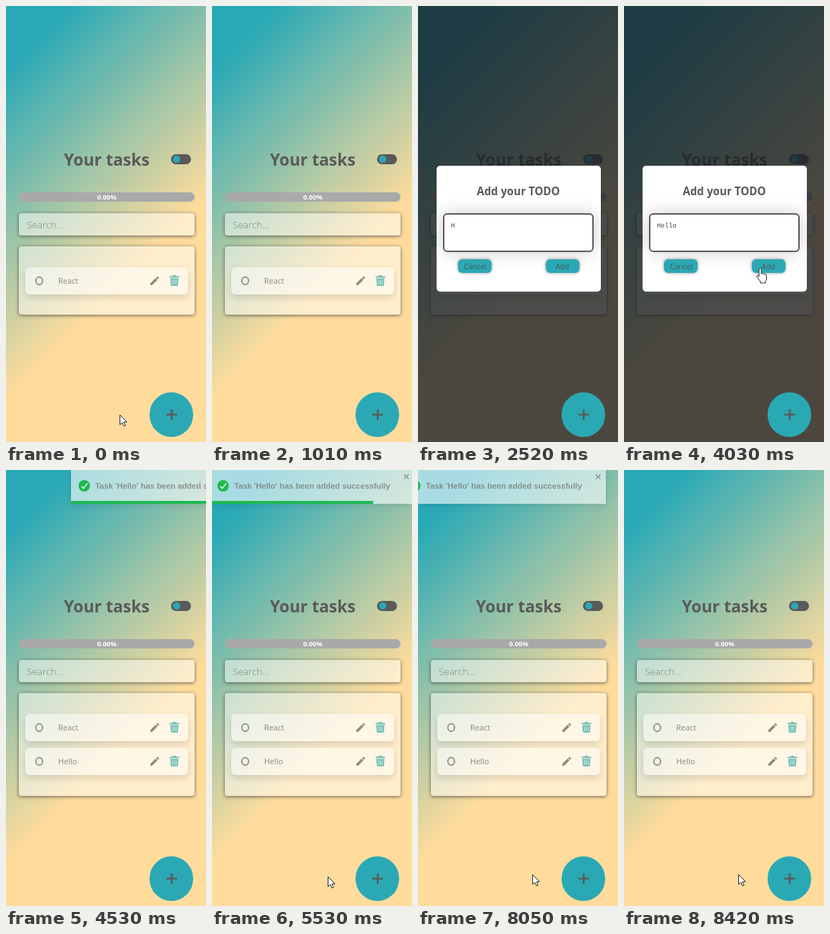
Write an HTML page that moves like this. It is 280 by 606 pixels and loops after 8.54 s.

```html
<!DOCTYPE html>
<html lang="en">
<head>
<meta charset="utf-8">
<title>Your tasks</title>
<style>
  html, body { margin: 0; width: 100%; height: 100%; overflow: hidden; }
  #stage { position: relative; width: 280px; height: 606px; overflow: hidden;
    background: linear-gradient(135deg, #29a9b6 10%, #ffdc9c 62%); }
  #stage div, #stage svg { position: absolute; box-sizing: border-box; }
  svg { left: 0; top: 0; overflow: visible; }
  text { font-family: "Open Sans", sans-serif; }
  .bold { font-weight: 700; }
  .middle { text-anchor: middle; }
  .layer { left: 0; top: 0; width: 280px; height: 606px; }
  .card { left: 18px; width: 246px; border-radius: 4px; background: rgba(255,255,255,.48);
    box-shadow: 0 1px 5px rgba(60,60,60,.8); }
  .row { left: 9px; width: 228px; height: 38px; border-radius: 6px;
    background: rgba(255,255,255,.5); box-shadow: 0 4px 10px rgba(0,0,0,.14); }
  #bar { left: 18px; top: 259px; width: 246px; height: 13px; border-radius: 7px; background: #a9a9a9; }
  #switch { left: 231px; top: 206px; width: 28px; height: 13.5px; border-radius: 7px; background: #5a5a5a; }
  #switch div { left: 2.5px; top: 1.5px; width: 10.5px; height: 10.5px; border-radius: 50%; background: #2aa9b5; }
  #shade { background: rgba(26,30,36,.78); }
  #dialog { left: 26px; top: 222px; width: 230px; height: 175px; border-radius: 5px; background: #fff; }
  #field { left: 9px; top: 66px; width: 211px; height: 54px; border: 2px solid #595959;
    border-radius: 6px; background: #fff; box-shadow: 0 0 25px rgba(0,0,0,.2); }
  .button { top: 130px; width: 47px; height: 19px; border-radius: 6px; background: #2aa9b5;
    box-shadow: 0 0 4px rgba(0,0,0,.45); }
  #fab { left: 200.5px; top: 537px; width: 61.5px; height: 61.5px; border-radius: 50%; background: #2aa9b5; }
  #toast { left: -3px; top: 0; width: 286px; height: 47px; background: rgba(255,255,255,.6);
    box-shadow: 0 1px 10px rgba(0,0,0,.12); }
  #life { left: 0; bottom: 0; width: 286px; height: 4.5px; background: #1fb950; transform-origin: left; }
</style>
</head>
<body>
<div id="stage">
  <div id="page" class="layer">
    <div id="switch"><div></div></div>
    <div id="bar"></div>
    <div class="card" style="top:288px;height:30.5px"></div>
    <div class="card" id="list" style="top:334px"></div>
    <svg width="280" height="606">
      <text class="bold middle" x="141" y="222" font-size="23" fill="#5a5a5a">Your tasks</text>
      <text class="bold middle" x="141" y="269" font-size="9.4" fill="#fff">0.00%</text>
      <text x="29" y="308.5" font-size="13.6" font-weight="300" fill="#7d857d">Search...</text>
    </svg>
  </div>
  <div id="modal" class="layer">
    <div id="shade" class="layer"></div>
    <div id="dialog">
      <div id="field"></div>
      <div class="button" style="left:30px"></div>
      <div class="button" style="left:153px"></div>
      <svg width="230" height="175">
        <text class="bold middle" x="114.5" y="41" font-size="15.2" fill="#5a5a5a">Add your TODO</text>
        <text class="middle" id="hint" x="114.5" y="90" font-size="14" fill="#ccc" style="font-family:'DejaVu Sans Mono',monospace">Add a task</text>
        <text id="typed" x="20" y="86" font-size="9.2" fill="#444" style="font-family:'Liberation Mono',monospace"></text>
        <g class="middle" font-size="10.2" fill="#4d5557">
          <text x="54" y="144">Cancel</text>
          <text x="176" y="144">Add</text>
        </g>
      </svg>
    </div>
  </div>
  <div id="fab">
    <svg width="61" height="61"><path d="M23.5 31h15M31 23.5v15" stroke="#5a5a5a" stroke-width="2.6"/></svg>
  </div>
  <div id="toast">
    <svg width="286" height="47">
      <circle cx="18.5" cy="22" r="8" fill="#1fb950"/>
      <path d="M14.5 22.5l3 3 5.5-7" fill="none" stroke="#d5efe5" stroke-width="1.5"/>
      <text class="bold" x="34" y="25.5" font-size="11.2" fill="#757575" fill-opacity=".75" style="font-family:'Liberation Sans',sans-serif">Task 'Hello' has been added successfully</text>
      <path d="M272 6l6.5 6.5m0-6.5L272 12.5" stroke="#86999a" stroke-width="1.5"/>
    </svg>
    <div id="life"></div>
  </div>
  <svg width="280" height="606">
    <g stroke="#222" stroke-width="1" stroke-linejoin="round" fill="#fff">
      <path id="arrow" d="M.5 .5v13.5l3.2-3 2.2 5 2.2-1-2.2-4.8h4.3z"/>
      <path id="hand" d="M3.5 12V2.2a1.6 1.6 0 0 1 3.2 0V8q1.4-1 2.6.4 1.4-.8 2.4.6 2.3-.6 2.3 1.6v4.2q0 2.2-1.5 3.6V21H5.5v-2L1 13.3Q-.6 10.6 1.5 10.4z"/>
    </g>
  </svg>
</div>
<script>
const LOOP = 8540, TOAST_START = 4928, TOAST_LIFE = 3000;
const byId = id => document.getElementById(id);
const show = (el, on) => { el.style.display = on ? '' : 'none'; };

const row = (label, top) => `<div class="row" style="top:${top}px"><svg width="228" height="38">
  <ellipse cx="19.5" cy="19" rx="4.7" ry="5.2" fill="none" stroke="#929687" stroke-width="2"/>
  <text x="46" y="23" font-size="11" fill="#858a7c">${label}</text>
  <path transform="translate(173 10.7) scale(.68)" fill="#8d8c79" d="M3 17.25V21h3.75L17.81 9.94l-3.75-3.75zM20.71 7.04a1 1 0 0 0 0-1.41l-2.34-2.34a1 1 0 0 0-1.41 0l-1.83 1.83 3.75 3.75z"/>
  <path d="M202 12.5h4l1-1.5h3.5l1 1.5h4v2h-13.5zM203 15.5h11.5l-.8 9.5q-.1 1-1.1 1h-7.7q-1 0-1.1-1z" fill="#76c0b7"/>
  <path d="M206.3 17.5v6.5M208.8 17.5v6.5M211.2 17.5v6.5" stroke="#d3ebe4"/>
</svg></div>`;
const list = byId('list');
list.innerHTML = row('React', 29) + row('Hello', 76);

// Each scene holds until the next: arrow/hand = pointer place, typed = open dialog, toast = sideways offset
const scenes = [
  { at: 0, arrow: [159, 568] },
  { at: 500, hand: [241, 571] },
  { at: 1010 },
  { at: 1510, typed: '', hand: [208, 560] },
  { at: 2010, typed: '' },
  { at: 2520, typed: 'H' },
  { at: 3020, typed: 'Hel' },
  { at: 3520, typed: 'Hell' },
  { at: 4030, typed: 'Hello', hand: [185.5, 364] },
  { at: 4530, toast: 94 },
  { at: 5030, toast: 0 },
  { at: 5530, toast: 0, arrow: [162, 565] },
  ...[6050, 6540, 7040, 7540].map(at => ({ at, toast: 0, arrow: [160, 562] })),
  { at: 8050, toast: -20, arrow: [160, 562] },
  { at: 8420, arrow: [160, 562] },
];

function draw(time) {
  const scene = scenes.findLast(s => s.at <= time);
  const added = scene.at >= 4530;
  byId('page').style.transform = added ? 'translateY(-24px)' : '';
  list.style.height = added ? '143px' : '95px';
  show(list.lastElementChild, added);

  show(byId('modal'), 'typed' in scene);
  show(byId('hint'), !scene.typed);
  byId('typed').textContent = scene.typed || '';

  show(byId('toast'), 'toast' in scene);
  byId('toast').style.transform = `translateX(${scene.toast || 0}px)`;
  const left = 1 - (scene.at - TOAST_START) / TOAST_LIFE;
  byId('life').style.transform = `scaleX(${Math.min(1, Math.max(0, left))})`;

  for (const kind of ['arrow', 'hand']) {
    show(byId(kind), scene[kind]);
    if (scene[kind]) byId(kind).setAttribute('transform', `translate(${scene[kind]})`);
  }
}

function tick() {
  draw(performance.now() % LOOP);
  requestAnimationFrame(tick);
}
tick();
</script>
</body>
</html>
```
